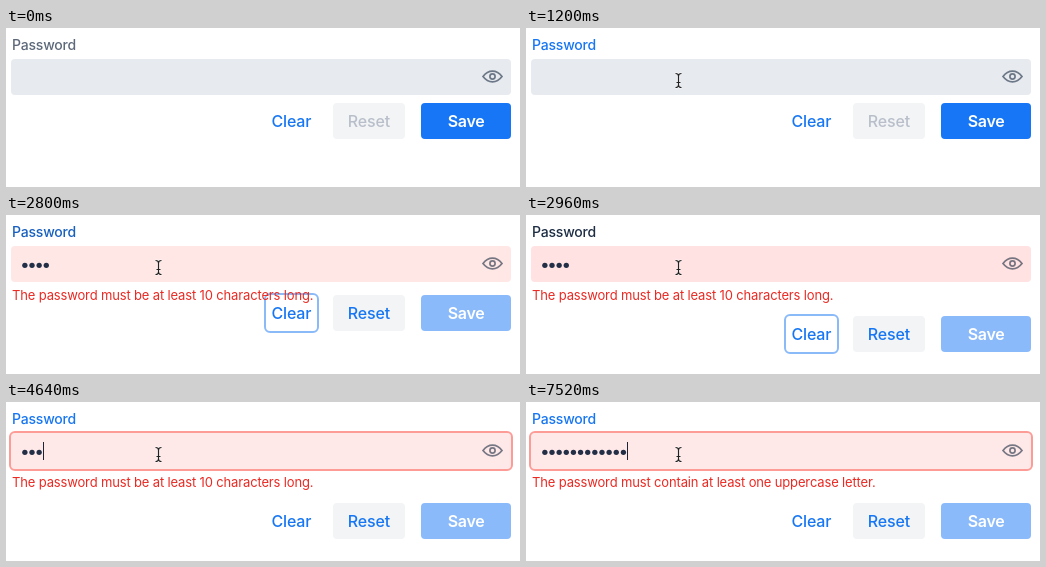
An HTML page that plays this animation: 514 px wide and 159 px high, repeating every 8 s.

```html
<!DOCTYPE html>
<html lang="en">
<head>
<meta charset="utf-8">
<title>Password field</title>
<style>
  html, body { margin: 0; height: 100%; overflow: hidden; background: #fff; }
  svg { display: block; font-family: Inter, sans-serif; }
  .label { font-size: 14px; font-weight: 500; letter-spacing: -.2px; }
  .error { font-size: 13px; letter-spacing: -.15px; fill: #ea2a23; }
  .button { font-size: 16px; font-weight: 500; letter-spacing: -.15px; text-anchor: middle; }
  .primary { font-weight: 600; letter-spacing: -.3px; fill: #fff; }
</style>
</head>
<body>
<svg id="stage" width="514" height="159" viewBox="0 0 514 159"></svg>
<script>
const LOOP = 8000, STEP = 80, BLINK = 480;
const HOVER = 540, FOCUS = 700, BLUR = 2740, REFOCUS = 3460;
const INVALID = 2800, SELECT = 3520, RETYPE = 4560, LONG_ENOUGH = 6480;
const TEXT_LEFT = 15.3, DOT_PITCH = 7.14;

// [time, number of characters in the field]
const EDITS = [[0, 0], [720, 0], [2160, 1], [2240, 2], [2320, 3], [2400, 4],
  [4560, 1], [4640, 3], [4720, 4], [4880, 6], [4960, 8], [6480, 10], [6560, 12]];

const GREY = [93, 105, 122], DARK = [29, 45, 68], BLUE = [22, 118, 243];
const FIELD = [231, 234, 239], FIELD_HOVER = [221, 225, 232];
const PINK = [255, 233, 232], PINK_HOVER = [255, 226, 225];

const stage = document.getElementById('stage');
const mix = (a, b, k) => a.map((v, i) => v + (b[i] - v) * k);
const rgb = c => `rgb(${c.map(Math.round)})`;
const rect = (x, y, w, h, r, attrs) =>
  `<rect x="${x}" y="${y}" width="${w}" height="${h}" rx="${r}" ${attrs}/>`;
const text = (x, y, cls, str, attrs = '') =>
  `<text x="${x}" y="${y}" class="${cls}" ${attrs}>${str}</text>`;

function pointer(t) {
  if (t < 160) return '';
  if (t < 560) {
    const tip = t < 240 ? '148 53' : '152.5 51';
    return `<path transform="translate(${tip})" d="M0 0V16L3.8 12.6 6.3 18.2 8.9 17 6.4 11.5H11.5Z"
      stroke="#fff" stroke-linejoin="round"/>`;
  }
  const beam = 'M149.5 45.5Q152.5 45.5 152.5 48Q152.5 45.5 155.5 45.5M152.5 48V57' +
    'M149.5 59.5Q152.5 59.5 152.5 57Q152.5 59.5 155.5 59.5M150.5 54.5H154.5';
  return `<path d="${beam}" fill="none" stroke="#fff" stroke-opacity=".6" stroke-width="2.6"/>
    <path d="${beam}" fill="none" stroke="#222" stroke-width="1.2"/>`;
}

function draw(t) {
  const ramp = start => Math.min(1, Math.max(0, (t - start) / 200));
  const focus = ramp(FOCUS) - ramp(BLUR) + ramp(REFOCUS);
  const hover = Math.max(0, ramp(HOVER) - focus);
  const invalid = t >= INVALID, selected = t >= SELECT && t < RETYPE;
  const [lastEdit, count] = EDITS.findLast(e => e[0] <= t);
  const typing = t >= 720 && !invalid || t >= RETYPE;
  const caretOn = typing && Math.floor((t - lastEdit) / BLINK) % 2 === 0;
  const top = !invalid ? 75 : t < 2880 ? 80 : t < 2960 ? 94 : 101;
  const baseline = top + 24;
  const blue = `fill="${rgb(BLUE)}"`;

  let out = text(6, 22, 'label', 'Password',
    `fill="${rgb(mix(mix(GREY, DARK, ramp(HOVER)), BLUE, focus))}"`);

  const fill = invalid ? mix(PINK, PINK_HOVER, hover) : mix(FIELD, FIELD_HOVER, hover);
  out += rect(5, 31, 500, 36, 4, `fill="${rgb(fill)}"`);
  if (t >= SELECT) out += rect(4, 30, 502, 38, 5, 'fill="none" stroke="#fd9b96" stroke-width="2"');
  if (selected) out += rect(15, 40, 29, 18, 0, 'fill="#b3c9ef"');
  for (let i = 0; i < count; i++)
    out += `<circle cx="${TEXT_LEFT + DOT_PITCH * (i + .5)}" cy="50.3" r="2.65" fill="#222f47"/>`;
  if (caretOn) out += rect(Math.round(TEXT_LEFT + DOT_PITCH * count), 40, 1, 18, 0, 'fill="#1d2433"');

  out += `<g fill="none" stroke="#1b2b41" stroke-opacity=".6" stroke-width="1.7">
    <path d="M477 48.5Q481 43.2 486.5 43.2T496 48.5Q492 53.8 486.5 53.8T477 48.5Z"/>
    <circle cx="486.5" cy="48.5" r="2.6"/></g>`;

  if (invalid && t < SELECT)
    out += rect(259, top - 1, 53, 38, 5, 'fill="none" stroke="#8bbaf9" stroke-width="2"');
  out += text(285.4, baseline, 'button', 'Clear', blue);
  out += rect(327, top, 72, 36, 4, 'fill="#f3f4f6"');
  out += text(363, baseline, 'button', 'Reset', t < 2160 ? 'fill="#b9bfca"' : blue);
  out += rect(415, top, 90, 36, 4, invalid ? 'fill="#8bbafb"' : 'fill="#1676f5"');
  out += text(460, baseline, 'button primary', 'Save');

  if (invalid) out += text(6, 85, 'error', t < LONG_ENOUGH
    ? 'The password must be at least 10 characters long.'
    : 'The password must contain at least one uppercase letter.');

  stage.innerHTML = out + pointer(t);
}

let shown = -1;
function tick() {
  const t = Math.floor(performance.now() % LOOP / STEP) * STEP;
  if (t !== shown) draw(shown = t);
  requestAnimationFrame(tick);
}
tick();
</script>
</body>
</html>
```
